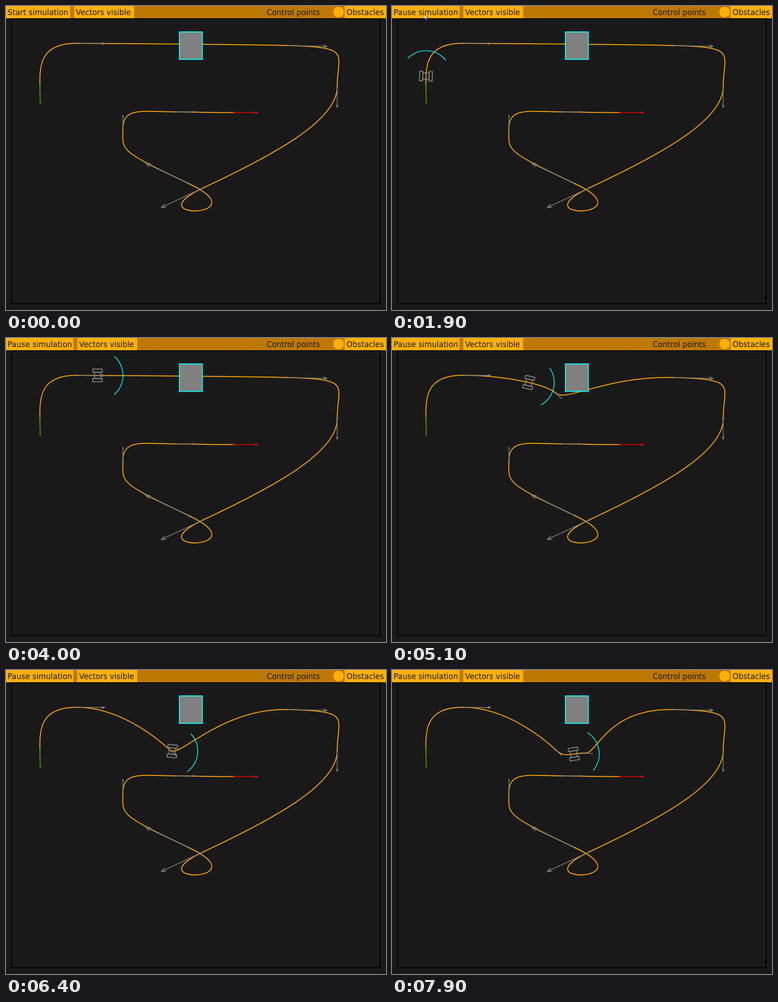
An HTML page with a canvas that plays this animation: 837x669 px, repeating every 8000 ms.

```html
<!DOCTYPE html>
<html lang="en">
<head>
<meta charset="utf-8">
<title>Path simulation</title>
<style>
  html, body { margin: 0; width: 100%; height: 100%; overflow: hidden; background: #191919; }
  canvas { display: block; }
</style>
</head>
<body>
<canvas id="stage" width="837" height="669"></canvas>
<script>
const ctx = document.getElementById('stage').getContext('2d');
const LOOP = 8000, TICK = 100;
const CLICK = 1200, FIRST_INSERT = 4800, SECOND_INSERT = 6500;
const SPEED = 0.39;          // path segments per second
const VELOCITY_SCALE = 5;    // path velocity per unit of visible vector
const GRAY = '#808080', CYAN = '#00ffff', ORANGE = '#ffa500', AMBER = '#ffb000', DARK = '#191919';

const node = (x, y, dx, dy, color = GRAY) => ({ x, y, dx, dy, color });
const route = [
  node(75.5, 214, 0, -39.5, '#008000'),
  node(158, 82, 59, 0.6),
  node(619.5, 87, 87.5, 2),
  node(729.5, 178, 0, 44.5),
  node(435, 400, -93, 43.5),
  node(403, 391, -95.5, -45),
  node(257.5, 270, 0, -29),
  node(372.5, 233, 42.5, 0.3),
  node(502, 234.5, 52, 0, '#ff0000')
];

const clamp = (v, lo = 0, hi = 1) => Math.min(hi, Math.max(lo, v));
const mix = (a, b, t) => a + (b - a) * t;

// The route, with the detour points that are added while the car drives
function nodesAt(time) {
  const nodes = [...route];
  if (time >= FIRST_INSERT) {
    const y = mix(84, 176.5, clamp((time - 4750) / 850));
    const turn = clamp((time - 4700) / 300) * 0.76;
    nodes.splice(2, 0, node(361.5, y, 16.5 * Math.cos(turn), 16.5 * Math.sin(turn)));
  }
  if (time >= SECOND_INSERT) nodes.splice(3, 0, node(425.5, 183, 16, 1));
  return nodes;
}

// Cubic Hermite segment
function pointOn(a, b, t) {
  const blend = t * t * (3 - 2 * t);
  const leave = t * (1 - t) ** 2 * VELOCITY_SCALE;
  const arrive = -t * t * (1 - t) * VELOCITY_SCALE;
  return [
    mix(a.x, b.x, blend) + a.dx * leave + b.dx * arrive,
    mix(a.y, b.y, blend) + a.dy * leave + b.dy * arrive
  ];
}

function fillRect(color, ...box) {
  ctx.fillStyle = color;
  ctx.fillRect(...box);
}

function setPen(color, width) {
  ctx.strokeStyle = color;
  ctx.lineWidth = width;
}

function drawPath(nodes) {
  const k = VELOCITY_SCALE / 3;
  setPen(ORANGE, 2);
  ctx.beginPath();
  ctx.moveTo(nodes[0].x, nodes[0].y);
  nodes.slice(1).forEach((b, i) => {
    const a = nodes[i];
    ctx.bezierCurveTo(a.x + a.dx * k, a.y + a.dy * k, b.x - b.dx * k, b.y - b.dy * k, b.x, b.y);
  });
  ctx.stroke();
}

function drawVector({ x, y, dx, dy, color }) {
  const length = Math.hypot(dx, dy), head = length * 0.1;
  ctx.save();
  ctx.translate(x, y);
  ctx.rotate(Math.atan2(dy, dx));
  setPen(color, 1.6);
  ctx.beginPath();
  ctx.moveTo(0, 0);
  ctx.lineTo(length, 0);
  ctx.moveTo(length - head, -head * 0.4);
  ctx.lineTo(length, 0);
  ctx.lineTo(length - head, head * 0.4);
  ctx.stroke();
  ctx.fillStyle = color;
  ctx.beginPath();
  ctx.arc(0, 0, 2.1, 0, 7);
  ctx.fill();
  ctx.restore();
}

function drawCar(nodes, progress) {
  const i = Math.floor(progress), t = progress - i;
  const [x, y] = pointOn(nodes[i], nodes[i + 1], t);
  const [nextX, nextY] = pointOn(nodes[i], nodes[i + 1], t + 0.002);
  ctx.save();
  ctx.translate(x, y);
  ctx.rotate(Math.atan2(nextY - y, nextX - x));
  setPen(GRAY, 2);
  for (const side of [-14, 7]) ctx.strokeRect(-10.5, side, 21, 7);
  ctx.strokeRect(-7, -7, 14, 14);
  setPen(CYAN, 1.6);
  ctx.beginPath();
  ctx.arc(0, 0, 56, -0.85, 0.85);
  ctx.stroke();
  ctx.restore();
}

function drawLabel(text, x) {
  ctx.fillStyle = DARK;
  ctx.font = '16.8px "DejaVu Sans", sans-serif';
  ctx.fillText(text, x, 19.5);
}

function drawButton(text, x, width) {
  fillRect(AMBER, x, 0, width, 27);
  drawLabel(text, x + 4);
}

function drawToolbar(running) {
  const shift = running ? 7 : 0;
  fillRect('#bd7800', 0, 0, 837, 27);
  drawButton(running ? 'Pause simulation' : 'Start simulation', -0.5, 142 + shift);
  drawButton('Vectors visible', 150 + shift, 132);
  drawLabel('Control points', 574);
  drawButton('Obstacles', 746, 91);
  ctx.fillStyle = AMBER;
  ctx.beginPath();
  ctx.roundRect(721, 2, 23, 22.5, 10);
  ctx.fill();
}

const arrowShape = new Path2D('M0 0V11L2.5 8.8 4.3 13 6.2 12.2 4.4 8.2H7.6Z');

// The pointer comes in from above, presses the first button and leaves again
function drawPointer(time) {
  const reach = clamp(Math.min((time - 300) / 700, (3800 - time) / 600));
  ctx.save();
  ctx.translate(mix(76, 71, reach), mix(-16, 18, reach));
  ctx.fillStyle = '#fff';
  ctx.fill(arrowShape);
  setPen('#000', 0.7);
  ctx.stroke(arrowShape);
  ctx.restore();
}

function draw(time) {
  const running = time >= CLICK;
  const nodes = nodesAt(time);
  fillRect(DARK, 0, 0, 837, 669);
  setPen('#000', 2);
  ctx.strokeRect(12, 27.5, 812, 627.5);

  drawPath(nodes);
  nodes.forEach(drawVector);

  fillRect(GRAY, 382, 57, 50.5, 60.5);
  setPen(CYAN, 2);
  ctx.strokeRect(382, 57, 50.5, 60.5);

  if (running) drawCar(nodes, 0.037 + SPEED * (time - CLICK) / 1000);
  drawToolbar(running);
  drawPointer(time);
}

const start = performance.now();
function frame() {
  const time = (performance.now() - start) % LOOP;
  draw(Math.floor(time / TICK) * TICK);
  requestAnimationFrame(frame);
}
frame();
</script>
</body>
</html>
```
